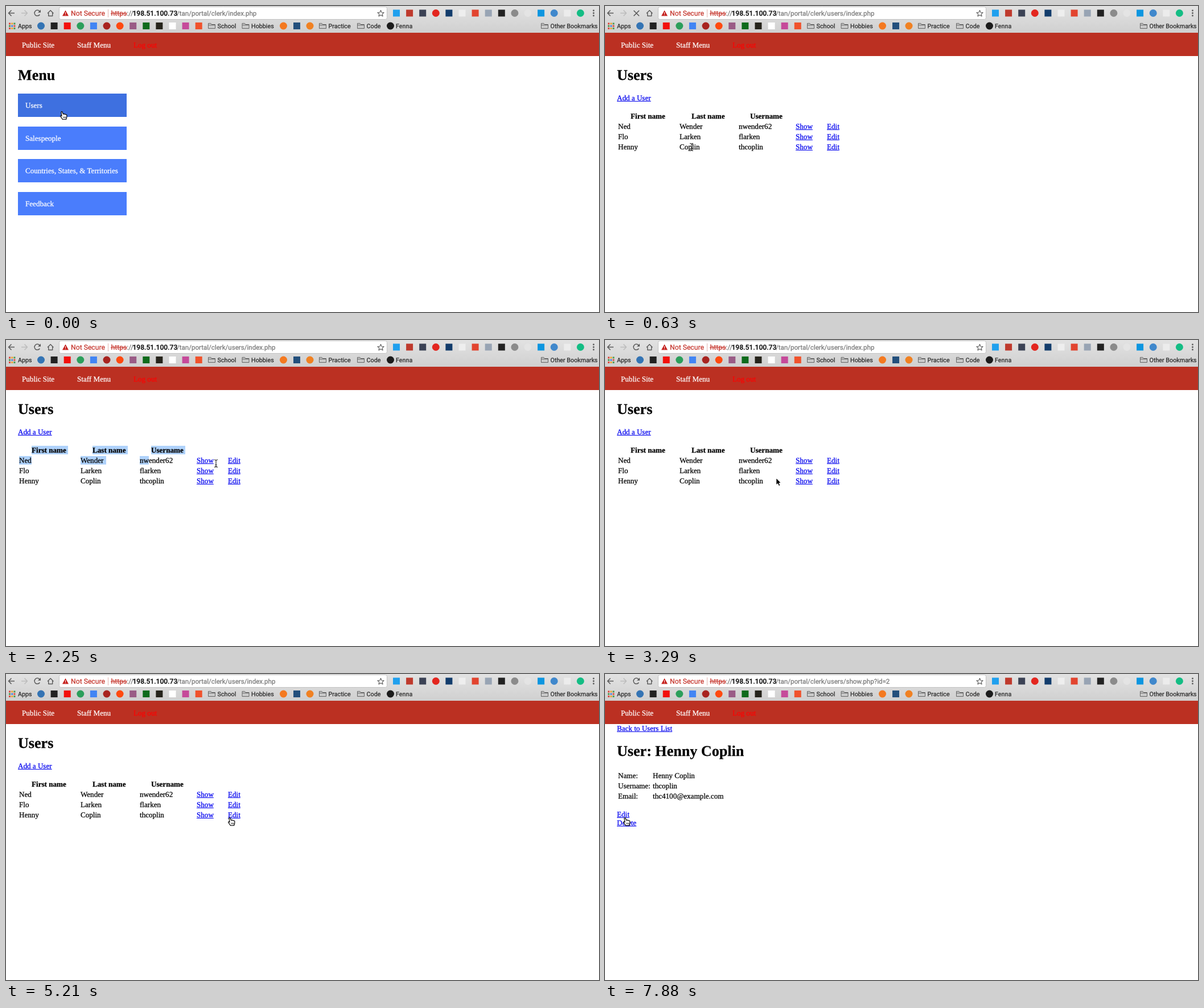
An HTML page with a canvas for the animation above (8000 ms loop, 1042 px wide and 538 px high).

```html
<!DOCTYPE html>
<html lang="en">
<head>
<meta charset="utf-8">
<title>Staff menu</title>
<style>
html, body { margin: 0; width: 100%; height: 100%; overflow: hidden; background: #fff; }
canvas { display: block; }
</style>
</head>
<body>
<canvas id="stage" width="1042" height="538"></canvas>
<script>
const ctx = document.getElementById('stage').getContext('2d');
const LOOP = 8000;
const SERIF = '"Liberation Serif", "Times New Roman", serif';
const SANS = 'Roboto, "Open Sans", sans-serif';
const BODY = '13.1px ' + SERIF;
const BOLD = 'bold 13.1px ' + SERIF;
const HEAD = 'bold 26.1px ' + SERIF;
const SMALL = '10.75px ' + SANS;
const LINK = '#0000ee';
const GREY = '#5a5a5a';

const people = [
  ['Ned', 'Wender', 'nwender62'],
  ['Flo', 'Larken', 'flarken'],
  ['Henny', 'Coplin', 'thcoplin']
];

// c = circle, s = square
const bookmarks = ['c#3474b4', 's#222222', 's#f3100c', 'c#2c9f5b', 's#4285f4', 'c#a82420', 'c#ff4a10',
  's#9a5c86', 's#0f6b1c', 's#26241c', 's#ffffff', 's#c64a9a', 's#f0522c'];
const tools = ['s#20a0ee', 's#bf3a2d', 's#3b4255', 'c#e3261f', 's#123c6c', 's#eeeeee', 's#e2442f', 's#98a4b4',
  's#222222', 'c#8b8b8b', 'c#e4e4e4', 's#0d96e0', 'c#4088cc', 's#ececec', 'c#14bd84'];

// Pointer moves: start, end, pointer kind per step (h hand, i text bar, a arrow), path x,y...
const moves = [
  [0, 0, 'h', [101, 192]],
  [150, 780, 'hhiii', [101, 192, 101, 192, 128, 222, 152, 248, 152, 248]],
  [1080, 2110, 'aaaiiiii', [110, 285, 25, 300, 20, 240, 120, 222, 228, 215]],
  [2250, 2840, 'iaaaa', [369, 217, 415, 228, 436, 240]],
  [3290, 4320, 'aaaiiaii', [304, 250, 165, 254, 27, 258]],
  [4470, 5510, 'iiiaahhh', [25, 246, 60, 230, 145, 232, 235, 238, 320, 248, 396, 259, 380, 259, 357, 255]],
  [5650, 6100, 'hhhh', [357, 255, 353, 255]],
  [6400, 6700, 'haa', [353, 255]],
  [7150, 7880, 'aaaaah', [330, 276, 270, 288, 190, 287, 110, 280, 55, 267, 38, 259]]
];

function pointerAt(t) {
  const [from, to, kinds, path] = moves.filter(m => m[0] <= t).pop();
  const last = kinds.length - 1;
  const gap = (to - from) / (last || 1);
  let i = 0;
  while (i < last && t >= Math.floor((from + (i + 1) * gap) / 10) * 10) i++;
  const n = path.length / 2 - 1;
  const u = last ? i / last * n : 0;
  const a = Math.min(Math.floor(u + 1e-6), n), b = Math.min(a + 1, n);
  const mix = k => path[2 * a + k] + (path[2 * b + k] - path[2 * a + k]) * (u - a);
  return { kind: kinds[i], x: Math.round(mix(0)), y: Math.round(mix(1)) };
}

function rect(x, y, w, h, color) {
  ctx.fillStyle = color;
  ctx.fillRect(x, y, w, h);
}

// The hairline stroke gives the letters slightly heavier stems.
function text(str, x, y, font = BODY, color = '#000') {
  ctx.font = font;
  ctx.fillStyle = ctx.strokeStyle = color;
  ctx.lineWidth = .25;
  ctx.fillText(str, x, y);
  ctx.strokeText(str, x, y);
  return ctx.measureText(str).width;
}

function link(str, x, y) {
  const w = text(str, x, y, BODY, LINK);
  rect(x, y + 1, w, 1, LINK);
}

function shape(d, fill, stroke, width = 1) {
  const p = new Path2D(d);
  if (fill) { ctx.fillStyle = fill; ctx.fill(p); }
  if (stroke) { ctx.strokeStyle = stroke; ctx.lineWidth = width; ctx.stroke(p); }
}

function dot(x, y, r, color) {
  ctx.fillStyle = color;
  ctx.beginPath();
  ctx.arc(x, y, r, 0, Math.PI * 2);
  ctx.fill();
}

function badge(code, x, y) {
  const color = code.slice(1);
  if (code[0] === 'c') dot(x, y, 6.5, color);
  else rect(x - 6, y - 6, 12, 12, color);
}

function folder(label, x) {
  shape(`M${x + .5} 39.5v-9h4.5l1.5 2h6v7z M${x + .5} 33.5h12`, '#c9c9c9', '#666');
  text(label, x + 16.5, 39, SMALL, '#2b2b2b');
}

function toolbar(t) {
  const g = ctx.createLinearGradient(0, 0, 0, 47);
  g.addColorStop(0, '#e2e2e2');
  g.addColorStop(1, '#d0d0d0');
  rect(0, 0, 1042, 47, g);

  shape('M15 12.5H4.5M9.5 7.5l-5 5l5 5', null, GREY, 1.5);
  shape('M27 12.5H37.5M32.5 7.5l5 5l-5 5', null, '#bcbcbc', 1.5);
  const loading = t >= 150 && t < 780 || t >= 5650 && t < 6700;
  if (loading) {
    shape('M50.5 8l9.5 9.5M60 8l-9.5 9.5', null, GREY, 1.6);
  } else {
    shape('M59.3 15A5 5 0 1 1 58.8 9', null, GREY, 1.5);
    shape('M61 6.5v5h-5z', GREY);
  }
  shape('M73 13l5.2-5.2l5.2 5.2M74.7 12v5.5h7V12', null, GREY, 1.4);

  ctx.beginPath();
  ctx.roundRect(93.5, 1.5, 576, 22, 3);
  ctx.fillStyle = '#fff';
  ctx.fill();
  ctx.strokeStyle = '#c3c3c3';
  ctx.lineWidth = 1;
  ctx.stroke();
  shape('M104.5 7.5l5.5 10h-11z', '#c5221f');
  rect(104, 11, 1, 3, '#fff');
  rect(104, 15, 1, 1, '#fff');
  const big = '12.2px ' + SANS;
  text('Not Secure', 114, 17, big, '#c5352c');
  rect(179, 6, 1, 14, '#e3b6b2');
  const w = text('https', 184.5, 17, big, '#c5352c');
  rect(184, 13, w + 1, 1, '#c5352c');
  text('://', 184.5 + w, 17, big, '#777');
  text('198.51.100.73', 222.5, 17, '500 12.1px ' + SANS, '#111');
  const file = t < 300 ? 'index.php' : t < 6400 ? 'users/index.php' : 'users/show.php?id=2';
  text('/tan/portal/clerk/' + file, 300, 17, '11.55px ' + SANS, '#777');
  shape('M658.5 7.5l1.6 3.7l4 .3l-3 2.6l1 3.9l-3.6-2.1l-3.6 2.1l1-3.9l-3-2.6l4-.3z', null, GREY, 1.1);

  tools.forEach((c, i) => badge(c, 686 + 23.1 * i, 12.5));
  for (let i = 0; i < 3; i++) dot(1032.5, 8 + i * 4.5, 1.4, GREY);

  const hues = ['#e04a3f', '#f0a32c', '#4a9a52', '#4a80e0'];
  for (let i = 0; i < 9; i++) {
    const col = i % 3, row = (i - col) / 3;
    rect(5 + col * 4.2, 29.5 + row * 4.2, 3, 3, hues[(col + row * 2) % 4]);
  }
  text('Apps', 21, 39, SMALL, '#2b2b2b');
  bookmarks.forEach((c, i) => badge(c, 61.5 + 23.1 * i, 35));
  folder('School', 355);
  folder('Hobbies', 414.5);
  badge('c#f47920', 487.5, 35);
  badge('s#234f7c', 511, 35);
  badge('c#f08122', 534, 35);
  folder('Practice', 550);
  folder('Code', 617);
  badge('c#1c1c1c', 675.5, 35);
  text('Fenna', 685, 39, SMALL, '#2b2b2b');
  folder('Other Bookmarks', 940);
}

function nav() {
  rect(0, 47, 1042, 41, '#bb3022');
  text('Public Site', 28, 73, BODY, '#fff');
  text('Staff Menu', 125, 73, BODY, '#fff');
  text('Log out', 224, 73, BODY, '#ff0000');
}

function menuPage() {
  text('Menu', 21, 130, HEAD);
  ['Users', 'Salespeople', 'Countries, States, & Territories', 'Feedback'].forEach((label, i) => {
    const y = Math.round(154 + i * 57.7);
    rect(21, y, 191, 41, i ? '#4a7dfc' : '#3e70e0');
    text(label, 34, y + 25, BODY, '#fff');
  });
}

function selection() {
  const mark = (x, y, end) => rect(x, y, end - x, 15, '#afd2fb');
  mark(45, 186, 109);
  mark(152, 186, 214);
  mark(255, 186, 315);
  mark(23, 204, 45);
  mark(131, 204, 176);
  ctx.font = BODY;
  mark(235, 204, 235 + ctx.measureText(people[0][2].slice(0, 2)).width);
}

function usersPage(t) {
  text('Users', 21, 130, HEAD);
  link('Add a User', 21, 166);
  if (t >= 2250 && t < 3290) selection();
  text('First name', 45, 198, BOLD);
  text('Last name', 152, 198, BOLD);
  text('Username', 255, 198, BOLD);
  people.forEach(([first, last, user], i) => {
    const y = 216 + i * 18;
    text(first, 23, y);
    text(last, 131, y);
    text(user, 235, y);
    link('Show', 335, y);
    link('Edit', 390, y);
  });
}

function userPage() {
  const [first, last, user] = people[2];
  const name = first + ' ' + last;
  link('Back to Users List', 21, 100);
  text('User: ' + name, 21, 144, HEAD);
  [['Name:', name], ['Username:', user], ['Email:', 'thc4100@example.com']].forEach(([key, value], i) => {
    text(key, 23, 183 + i * 18);
    text(value, 84, 183 + i * 18);
  });
  link('Edit', 21, 251);
  link('Delete', 21, 266);
}

function pointer({ kind, x, y }) {
  ctx.save();
  ctx.translate(x, y);
  ctx.lineJoin = 'round';
  if (kind === 'h') {
    ctx.translate(.5, 0);
    shape('M-3.5 1.5L-4.6-5Q-4.4-7-2.8-6.2L-1-1.8Q0-3 1.2-1.6Q2.4-2.6 3.3-1Q5-1.7 5.4.2L5.2 4L4 7.5H-2L-5.6 2.2Q-6.2.2-4.4.6z', '#fff', '#000', 1.2);
    shape('M-.5 2.5v3M1.5 2.5v3M3.3 2.5v3', null, '#000', .8);
  } else if (kind === 'i') {
    shape('M-3-6.5Q0-6.5 0-4.5V4.5Q0 6.5-3 6.5M3-6.5Q0-6.5 0-4.5M0 4.5Q0 6.5 3 6.5M-1.5 2.5h3', null, '#222', 1.1);
  } else {
    shape('M-3-7V4.5L-.4 2.2L1.5 6.5L3.5 5.6L1.7 1.4H5z', '#000', '#fff', 1);
    shape('M-2.5-6V3.5L0 1.4L1.9 5.8L3 5.3L1.2.9H4z', '#000');
  }
  ctx.restore();
}

function draw(t) {
  rect(0, 0, 1042, 538, '#fff');
  ctx.textRendering = 'geometricPrecision';
  ctx.lineJoin = 'round';
  toolbar(t);
  nav();
  if (t < 460) menuPage();
  else if (t < 6550) usersPage(t);
  else userPage();
  pointer(pointerAt(t));
}

const start = performance.now();
function tick() {
  draw((performance.now() - start) % LOOP);
  requestAnimationFrame(tick);
}
tick();
</script>
</body>
</html>
```
